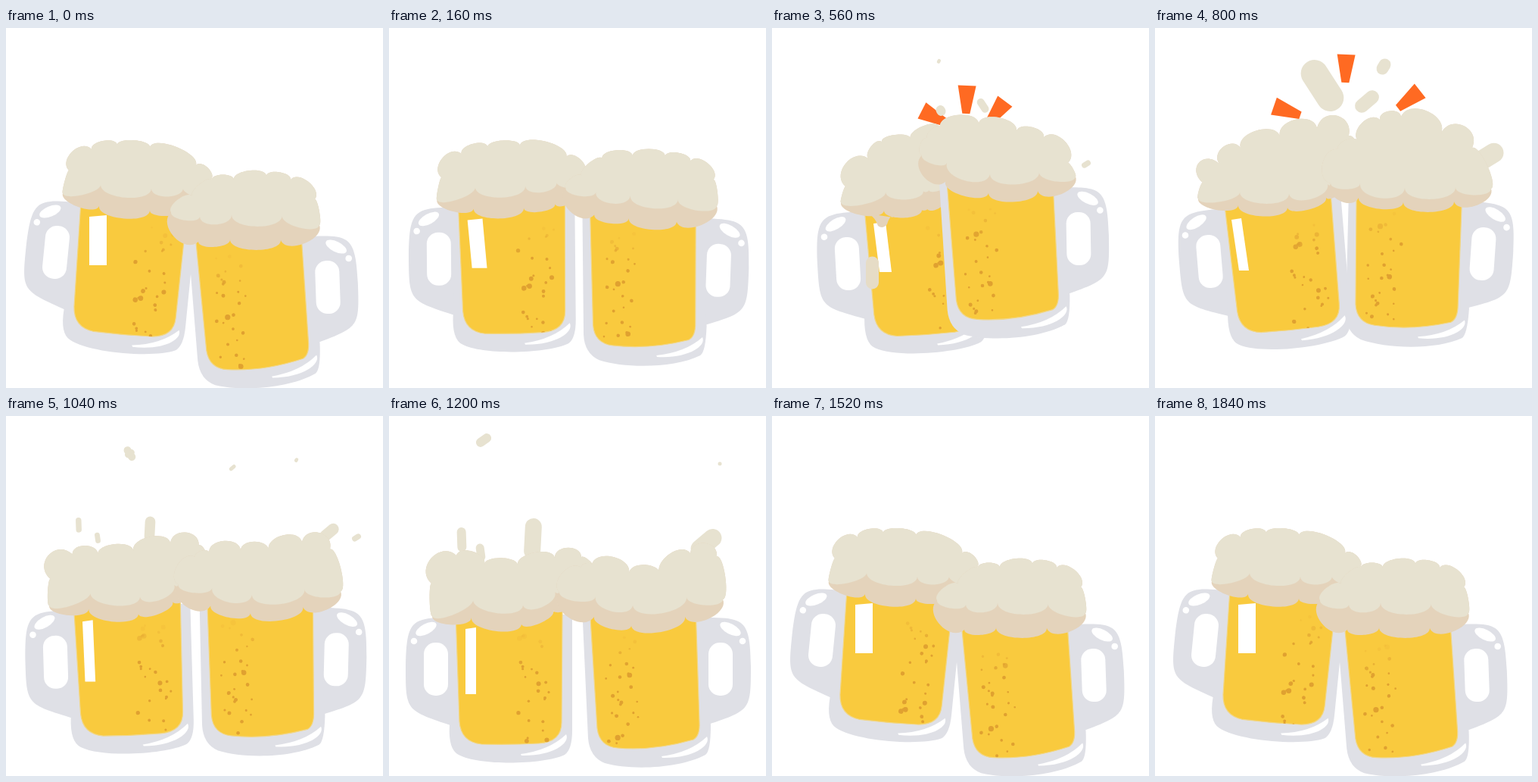
These frames come from a looping animation (498 by 475 pixels, 1.92 s). An HTML page with a canvas:

```html
<!DOCTYPE html>
<html lang="en">
<head>
<meta charset="utf-8">
<title>Cheers</title>
<style>
html, body { margin: 0; width: 100%; height: 100%; overflow: hidden; background: #fff; }
canvas { display: block; }
</style>
</head>
<body>
<canvas id="stage" width="498" height="475"></canvas>
<script>
const ctx = document.getElementById('stage').getContext('2d');
const LOOP = 1920, STEP = 80, RAD = Math.PI / 180;
const GLASS = '#dfe0e6', BEER = '#f9ca3e', RIM = '#f1d685', BUBBLE = '#e0a130';
const FOAM = '#e7e2d0', SHADE = '#e4d3bb', SPARK = '#ff6a22';

const ease = {
  flat: k => k,
  in: k => k * k,
  out: k => k * (2 - k),
  both: k => k * k * (3 - 2 * k)
};
const mix = (a, b, k) => Array.isArray(a) ? a.map((v, i) => mix(v, b[i], k)) : a + (b - a) * k;

// Each pose: mugs as x, y, angle; glare as x, y, width, run, drop;
// foam top points; cusps of the light part; depth of the shade; puff of the bumps.
const rest = {
  left: [66, 296, 5.7], right: [425, 342, -2], glare: [110, 249, 23, 0, 64],
  topL: [75, 218, 83, 188, 113, 160, 147, 154, 190, 157, 251, 181, 271, 200, 272, 225],
  lowL: [234, 211, 192, 212, 125, 206],
  topR: [218, 243, 246, 222, 272, 200, 301, 200, 344, 195, 376, 200, 408, 226, 414, 260],
  lowR: [365, 247, 298, 246, 256, 249],
  depth: [29, 33], puff: [.9, .9]
};
const apart = {
  left: [66, 321, -12], right: [454, 279, 9.5], glare: [92, 262, 14, 17, 62],
  topL: [42, 243, 44, 214, 64, 177, 100, 162, 141, 151, 204, 149, 234, 176, 238, 180],
  lowL: [198, 190, 158, 203, 93, 216],
  topR: [262, 152, 270, 144, 299, 120, 360, 111, 403, 121, 439, 130, 467, 152, 468, 188],
  lowR: [413, 187, 357, 176, 305, 157],
  depth: [29, 24], puff: [1, .9]
};
const clash = {
  left: [100, 311, -3.2], right: [405, 278, -1], glare: [134, 258, 16, 8, 64],
  topL: [91, 230, 97, 209, 128, 173, 145, 150, 183, 146, 221, 130, 250, 150, 250, 195],
  lowL: [207, 214, 200, 215, 150, 216],
  topR: [198, 168, 205, 145, 222, 130, 273, 126, 323, 136, 359, 144, 391, 178, 401, 196],
  lowR: [353, 190, 288, 193, 231, 178],
  depth: [25, 25], puff: [1, 1.05]
};
const burst = {
  left: [72, 308, -4.8], right: [433, 298, 4], glare: [101, 253, 13, 10, 67],
  topL: [57, 225, 63, 204, 85, 179, 113, 158, 165, 143, 214, 132, 256, 142, 258, 195],
  lowL: [228, 206, 177, 219, 112, 216],
  topR: [232, 205, 242, 160, 269, 150, 297, 121, 325, 117, 378, 139, 419, 158, 444, 212],
  lowR: [397, 210, 330, 211, 271, 205],
  depth: [18, 19], puff: [1.55, 1.4]
};
const low = {
  left: [62, 334, 0], right: [438, 334, 0], glare: [101, 281, 14, 0, 86],
  topL: [57, 264, 56, 221, 89, 184, 126, 196, 170, 197, 219, 187, 254, 186, 270, 200],
  lowL: [219, 232, 177, 250, 111, 241],
  topR: [225, 232, 254, 200, 268, 196, 317, 208, 359, 211, 398, 181, 433, 185, 441, 242],
  lowR: [393, 238, 322, 250, 273, 238],
  depth: [25, 27], puff: [1.1, 1.3]
};
const moves = [
  { t: 0, pose: rest, go: ease.both },
  { t: 400, pose: apart, go: ease.in },
  { t: 560, pose: clash, go: ease.out },
  { t: 800, pose: burst, go: ease.both },
  { t: 1200, pose: low, go: ease.out },
  { t: 1520, pose: rest, go: ease.flat },
  { t: LOOP, pose: rest }
];

// Bulges of the bumps: top edge, light lower edge, shaded lower edge.
const bulgeL = [[.06, .41, .27, .19, .22, .33, .15], [.15, .26, .22, .16], [.2, .18, .2, .2]];
const bulgeR = [[.25, .2, .25, .24, .25, .34, .1], [.2, .23, .28, .2], [.28, .2, .2, .36]];

const handle = new Path2D('M92 266C72 266 56 266 48 268C25 272 23 290 22 330C22 390 22 388 84 409L96 340Z');
const shine = new Path2D('M174 446Q212 441 234 420C240 432 215 449 175 448Z');
const mugs = {
  left: {
    px: 62, bubbleX: 190, flip: 1, shift: 0,
    body: new Path2D('M86 262L80 408Q78 440 92 447C120 462 205 460 232 447Q242 440 242 415V262Z'),
    beer: new Path2D('M88 258L93 403Q95 430 122 433Q160 434 198 432Q228 430 228 404L229 258Z')
  },
  right: {
    px: 438, bubbleX: 308, flip: -1, shift: 186,
    body: new Path2D('M255 250L263 425Q265 450 285 458C320 468 385 465 418 447Q425 442 425 408L412 250Z'),
    beer: new Path2D('M265 250L275 412Q278 436 302 438Q350 442 402 427Q411 422 410 404L405 250Z')
  }
};

// Flying foam: peak time, x, y, half length, radius, angle, speed per 100 ms.
const drops = [
  [560, 223, 109, 1, 6, 60, 0, -12],
  [800, 221, 76, 19, 18, 57, -24, -11],
  [1200, 125, 32, 5, 6, -35, -24, -11],
  [800, 302, 51, 3, 8, -60, 34, 3],
  [1200, 437, 63, 0, 2.5, 0, 34, 3],
  [800, 280, 97, 9, 9, -40, 8, -12],
  [1200, 96, 163, 10, 6, 88, 0, 12],
  [1200, 121, 180, 6, 5.5, 82, 0, 12],
  [1200, 190, 162, 16, 11, 93, 0, 8],
  [800, 439, 170, 10, 13, -32, 10, -4],
  [1200, 419, 168, 11, 12, -40, -5, 9]
];
const DROP_LIFE = 260;

// Sparks: x, y, angle at the clash and at the burst.
const sparks = [
  [[214, 117, 207], [174, 109, 199]],
  [[257, 94, -88], [252, 53, -88]],
  [[297, 111, -53], [336, 94, -38]]
];

function seeded(s) {
  return () => (s = (s * 16807) % 2147483647) / 2147483647;
}
function makeBubbles(seed) {
  const rnd = seeded(seed);
  return Array.from({ length: 27 }, () => ({ x: (rnd() - .5) * 44, phase: rnd(), r: 1.3 + 3 * rnd() * rnd() }));
}
mugs.left.bubbles = makeBubbles(4711);
mugs.right.bubbles = makeBubbles(90210);

function fill(color, path) {
  ctx.fillStyle = color;
  path ? ctx.fill(path) : ctx.fill();
}
function poly(points, color) {
  ctx.beginPath();
  for (const p of points) ctx.lineTo(...p);
  fill(color);
}
function oval(x, y, rx, ry, deg, color) {
  ctx.beginPath();
  ctx.ellipse(x, y, rx, ry, deg * RAD, 0, 7);
  fill(color);
}
function capsule(x, y, half, r, deg, color) {
  const dx = Math.cos(deg * RAD) * half, dy = Math.sin(deg * RAD) * half;
  ctx.beginPath();
  ctx.moveTo(x - dx, y - dy);
  ctx.lineTo(x + dx + .01, y + dy);
  ctx.lineCap = 'round';
  ctx.lineWidth = r * 2;
  ctx.strokeStyle = color;
  ctx.stroke();
}

// Closed outline whose sides swell outwards by the given bulges.
function bumps(p, bulge, color) {
  ctx.beginPath();
  ctx.moveTo(p[0], p[1]);
  bulge.forEach((b, i) => {
    const n = (2 * i + 2) % p.length;
    const x = p[2 * i], y = p[2 * i + 1], nx = p[n], ny = p[n + 1];
    const ox = (ny - y) * b * 4 / 3, oy = (x - nx) * b * 4 / 3;
    ctx.bezierCurveTo(x + ox, y + oy, nx + ox, ny + oy, nx, ny);
  });
  fill(color);
}
function foam(top, light, depth, puff, [topB, lightB, darkB]) {
  const swell = topB.map(b => b * puff);
  const dark = light.map((v, i) => i % 2 ? v + depth : v - 2);
  bumps([...top, ...dark], [...swell, ...darkB], SHADE);
  bumps([...top, ...light], [...swell, ...lightB], FOAM);
}

function mug(m, [x, y, deg], t) {
  ctx.save();
  ctx.translate(x, y);
  ctx.rotate(deg * RAD);
  ctx.save();
  ctx.scale(m.flip, 1);
  ctx.translate(-62, -334);
  fill(GLASS, handle);
  ctx.restore();
  ctx.translate(-m.px, -334);
  fill(GLASS, m.body);
  ctx.save();
  ctx.translate(m.px, 0);
  ctx.scale(m.flip, 1);
  ctx.beginPath();
  ctx.roundRect(-16, 299, 32, 70, 15);
  fill('#fff');
  oval(-13, 281, 15, 6.8, -28, '#fff');
  oval(-29, 297, 4.3, 4.3, 0, '#fff');
  ctx.restore();
  ctx.save();
  ctx.translate(m.shift, m.shift / 62);
  fill('#fff', shine);
  ctx.restore();
  fill(BEER, m.beer);
  ctx.lineWidth = 1.2;
  ctx.strokeStyle = RIM;
  ctx.stroke(m.beer);
  ctx.clip(m.beer);
  for (const b of m.bubbles) {
    const up = (b.phase + t / LOOP) % 1;
    ctx.globalAlpha = Math.max(.15, Math.min(1, (1 - up) * 3.5));
    oval(m.bubbleX + b.x + Math.sin(up * 9 + b.phase * 6) * 3, 436 - up * 148, b.r, b.r, 0, BUBBLE);
  }
  ctx.restore();
}

function poseAt(t) {
  const i = moves.findIndex(m => m.t > t), a = moves[i - 1], b = moves[i];
  const k = a.go((t - a.t) / (b.t - a.t));
  return name => mix(a.pose[name], b.pose[name], k);
}

function drawSparks(t) {
  if (t < 560 || t > 880) return;
  const k = ease.out(Math.min(1, (t - 560) / 240));
  const tail = t > 800 ? 0 : -19;
  for (const [from, to] of sparks) {
    const [x, y, deg] = mix(from, to, k);
    ctx.save();
    ctx.translate(x, y);
    ctx.rotate(deg * RAD);
    poly([[tail, -5], [18, -12], [18, 12], [tail, 5]], SPARK);
    ctx.restore();
  }
}

function drawDrops(t) {
  for (const [peak, x, y, half, r, deg, vx, vy] of drops) {
    const dt = t - peak, size = Math.sqrt(Math.max(0, 1 - Math.abs(dt) / DROP_LIFE));
    if (size) capsule(x + vx * dt / 100, y + vy * dt / 100, half * size, r * size, deg, FOAM);
  }
}

function drawDrip(t) {
  if (t < 320 || t > 600) return;
  const k = Math.max(0, (t - 400) / 160), grow = Math.min(1, (t - 240) / 160);
  const [ax, ay, bx, by, cx, cy] = mix([100, 242, 133, 272, 161, 231], [128, 245, 146, 264, 160, 250], k);
  const tip = ay + (by - ay) * grow;
  ctx.beginPath();
  ctx.moveTo(ax, ay);
  ctx.quadraticCurveTo(bx - 9, tip - 13, bx - 6, tip - 3);
  ctx.quadraticCurveTo(bx, tip + 2, bx + 6, tip - 5);
  ctx.quadraticCurveTo(bx + 10, tip - 18, cx, cy);
  fill(SHADE);
  capsule(132.5, 236 + 52 * grow + 35 * k, 10 * grow + 3 * k, 11 - 2.5 * k, 90, k > .6 ? '#e6dcc6' : SHADE);
}

function draw(t) {
  const pose = poseAt(t);
  const depth = pose('depth'), puff = pose('puff');
  ctx.fillStyle = '#fff';
  ctx.fillRect(0, 0, 498, 475);
  drawSparks(t);
  drawDrops(t);
  mug(mugs.left, pose('left'), t);
  const [x, y, w, dx, dy] = pose('glare');
  poly([[x, y], [x + w, y - 2], [x + w + dx, y + dy], [x + dx, y + dy]], '#fff');
  drawDrip(t);
  foam(pose('topL'), pose('lowL'), depth[0], puff[0], bulgeL);
  mug(mugs.right, pose('right'), t);
  foam(pose('topR'), pose('lowR'), depth[1], puff[1], bulgeR);
}

const start = performance.now();
function tick() {
  const t = (performance.now() - start) % LOOP;
  draw(Math.floor(t / STEP) * STEP);
  requestAnimationFrame(tick);
}
tick();
</script>
</body>
</html>
```
